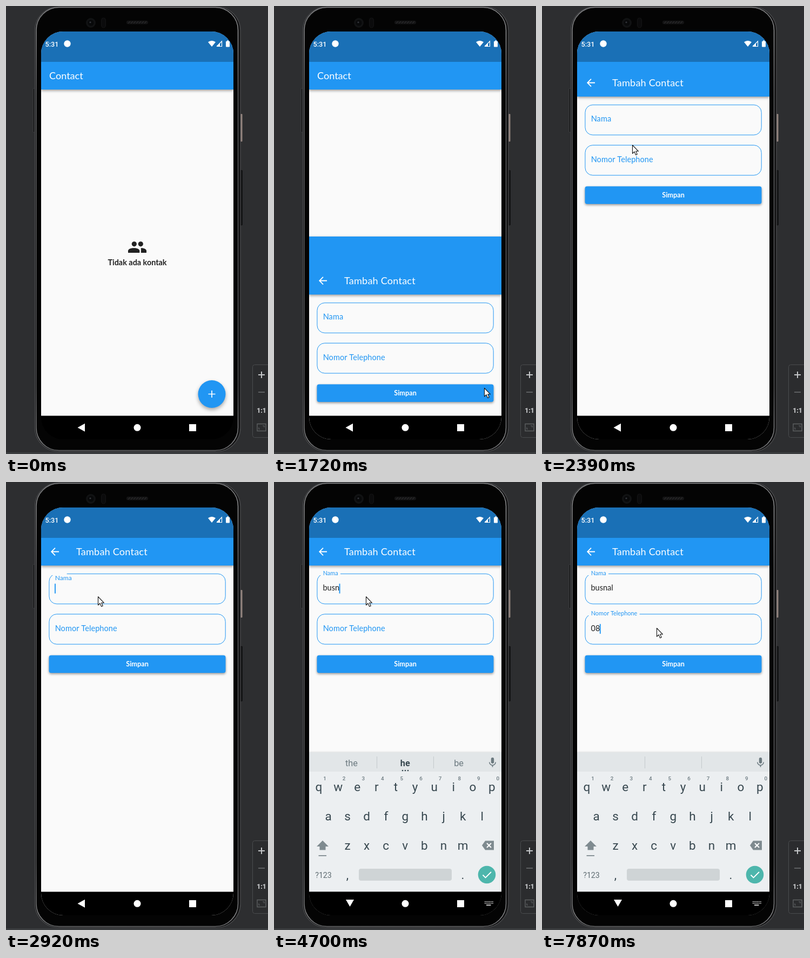
An HTML page with a canvas that plays this animation: 485 by 826 pixels, repeating every 8000 ms.

```html
<!DOCTYPE html>
<html lang="id">
<head>
<meta charset="utf-8">
<title>Contact</title>
<style>
html, body { margin: 0; width: 100%; height: 100%; overflow: hidden; background: #2d2e30; }
canvas { display: block; width: 485px; height: 826px; }
</style>
</head>
<body>
<canvas id="stage"></canvas>
<script>
const W = 485, H = 826, LOOP = 8000, STEP = 70;
const BLUE = '#2196f3', PAPER = '#fafafa', KEY = '#37474f', KEY_DIM = '#6c7a80';
const APP = 'Lato, sans-serif', SYS = 'Roboto, sans-serif';
const canvas = document.getElementById('stage');
const c = canvas.getContext('2d');
const dpr = window.devicePixelRatio || 1;
canvas.width = W * dpr;
canvas.height = H * dpr;

const NAME = 'busnal', PHONE = '08';
const NAME_AT = [4290, 4490, 4560, 4700, 4970, 5040];
const PHONE_AT = [7470, 7870];
const SLIDE = [[1270, 0], [1690, .337], [1900, .497], [2390, .826], [2740, 1]];
const MOUSE = [
  [220, 428, 826], [520, 362, 640], [620, 327, 603], [800, 360, 680], [990, 389, 704],
  [1690, 389, 704], [1900, 377, 656], [2390, 167, 256], [2670, 170, 211],
  [5610, 170, 211], [5960, 198, 293], [6380, 212, 269]
];
const HINTS = [
  [4630, 'the', 'he', 'be'], [4770, 'us', 'busy', 'bus'],
  [5170, 'bushel', NAME, 'casual'], [6600]
];

const clamp = v => Math.max(0, Math.min(1, v));
const mix = (a, b, p) => a + (b - a) * p;
const ramp = (t, a, b) => clamp((t - a) / (b - a));
const within = (t, a, b) => t >= a && t < b;
const typed = (text, times, t) => text.slice(0, times.filter(x => t >= x).length);

// Motion advances in held steps, as in a screen recording.
const held = t => Math.floor((t - 10) / STEP) * STEP + 10;

function track(keys, t) {
  let i = 0;
  while (i < keys.length - 2 && t >= keys[i + 1][0]) i++;
  const a = keys[i], b = keys[i + 1], p = ramp(t, a[0], b[0]);
  return a.slice(1).map((v, j) => mix(v, b[j + 1], p));
}

// cubic-bezier(.4, 0, .2, 1)
function standardEase(x) {
  let lo = 0, hi = 1;
  for (let i = 0; i < 24; i++) {
    const s = (lo + hi) / 2, r = 1 - s;
    if (1.2 * r * r * s + .6 * r * s * s + s * s * s < x) lo = s; else hi = s;
  }
  return lo * lo * (3 - 2 * lo);
}

function rect(x, y, w, h, fill) {
  c.fillStyle = fill;
  c.fillRect(x, y, w, h);
}

function round(x, y, w, h, r, fill, stroke, lw = 1) {
  c.beginPath();
  c.roundRect(x, y, w, h, r);
  if (fill) { c.fillStyle = fill; c.fill(); }
  if (stroke) { c.strokeStyle = stroke; c.lineWidth = lw; c.stroke(); }
}

function dot(x, y, r, fill) {
  c.beginPath();
  c.arc(x, y, r, 0, 7);
  c.fillStyle = fill;
  c.fill();
}

function path(pts, fill, stroke, lw = 1) {
  c.beginPath();
  for (let i = 0; i < pts.length; i += 2) c.lineTo(pts[i], pts[i + 1]);
  if (fill) { c.closePath(); c.fillStyle = fill; c.fill(); }
  if (stroke) { c.strokeStyle = stroke; c.lineWidth = lw; c.stroke(); }
}

function text(s, x, y, size, color, o = {}) {
  c.font = `${o.weight || 400} ${size}px ${o.font || APP}`;
  c.letterSpacing = (o.space || 0) + 'px';
  c.textAlign = o.align || 'left';
  c.fillStyle = color;
  c.fillText(s, x, y);
  return c.measureText(s).width;
}

function shaded(alpha, blur, dy, draw) {
  c.save();
  c.shadowColor = `rgba(0,0,0,${alpha})`;
  c.shadowBlur = blur * dpr;
  c.shadowOffsetY = dy * dpr;
  draw();
  c.restore();
}

function drawBody() {
  rect(0, 0, W, H, '#2d2e30');
  rect(0, 823, W, 3, '#3b3d3f');
  round(50, 152, 3, 81, 1, '#191a1b', '#48494b', .7);
  round(434, 199, 3.5, 51, 1, '#94857f');
  round(434, 303, 3.5, 101, 1, '#151617', '#090909', .7);

  const rim = c.createLinearGradient(0, 0, 0, H);
  rim.addColorStop(0, '#7c7d7f');
  rim.addColorStop(.06, '#a0a1a3');
  rim.addColorStop(.2, '#6c6d6f');
  rim.addColorStop(.85, '#5c5d5f');
  rim.addColorStop(.97, '#929395');
  rim.addColorStop(1, '#5c5d5f');
  round(53.5, 1.5, 380.5, 820, 44, '#131314', '#4c4d4f', 1.2);
  round(56, 2.5, 373.5, 817, 42, '#040404', rim, 1.3);

  dot(157, 31, 9, '#111213');
  dot(157, 31, 5.5, '#08090a');
  dot(156, 30, 1.6, '#34363b');
  round(176.5, 22, 8, 18, 4, '#0b0b0c', '#141415');
  round(223, 27, 40, 6.5, 3, '#141415');
  for (let x = 226; x < 261; x += 5) path([x, 32, x + 4, 28.5], null, '#2c2c2d', 1.2);
}

function drawTools() {
  round(456.5, 661.5, 40, 134, 4, '#2b2c2e', '#4a4c4e');
  path([467, 680, 479, 680], null, '#c4c6c8', 2);
  path([473, 674, 473, 686], null, '#c4c6c8', 2);
  path([467, 712, 479, 712], null, '#5d5f61', 2);
  text('1:1', 473, 749.5, 12, '#c4c6c8', { font: SYS, weight: 900, align: 'center' });
  round(465, 770.5, 16, 13, 0, null, '#5d5f61', 1.4);
  path([470, 780, 468, 780, 468, 777], null, '#5d5f61', 1.2);
  path([475, 774, 478, 774, 478, 777], null, '#5d5f61', 1.2);
}

function drawStatus() {
  rect(65, 47, 356, 56, '#1a70b6');
  text('5:31', 72.5, 74.5, 12.7, '#fff', { font: SYS, weight: 500 });
  dot(113.5, 69.5, 6.2, '#fff');
  c.beginPath();
  c.moveTo(381, 75);
  c.arc(381, 75, 11, -Math.PI * .72, -Math.PI * .28);
  c.fillStyle = '#fff';
  c.fill();
  path([390, 74.5, 399.5, 74.5, 399.5, 65, 390, 74.5], null, '#fff', 1.2);
  path([390, 74.5, 396, 74.5, 396, 68.5], '#fff');
  round(407, 65, 7, 10.5, 1.3, '#fff');
  rect(409, 63.5, 3, 2, '#fff');
}

function bar(y, h, title, x) {
  shaded(.4, 5, 2, () => rect(65, y, 356, h, BLUE));
  text(title, x, y + h - 19, 18.1, '#fff', { space: x > 100 ? .2 : 0 });
}

function drawHome() {
  rect(65, 47, 356, 709, PAPER);
  bar(47, 107, 'Contact', 80);
  const ink = '#212121';
  for (const x of [237.3, 249.3]) dot(x, 438.8, 4.6, ink);
  const bust = (x, w) => {
    c.beginPath();
    c.moveTo(x, 455);
    c.lineTo(x, 451.3);
    c.bezierCurveTo(x, 444.4, x + w, 444.4, x + w, 451.3);
    c.lineTo(x + w, 455);
    c.fillStyle = ink;
    c.fill();
  };
  c.save();
  c.beginPath();
  c.rect(249.9, 440, 12, 16);
  c.clip();
  bust(239, 21);
  c.restore();
  bust(226, 21.3);
  text('Tidak ada kontak', 243, 477.5, 14.4, ink, { weight: 700, align: 'center' });
  shaded(.34, 7, 3.5, () => dot(381, 715.5, 25.5, BLUE));
  path([374.5, 715.5, 387.5, 715.5], null, '#fff', 1.7);
  path([381, 709, 381, 722], null, '#fff', 1.7);
}

function field(y, label, float, value, caret) {
  round(79.9, y + .3, 326.3, 55.5, 14, null, BLUE, 1);
  const size = mix(14.5, 10.9, float);
  if (float > 0) {
    c.font = `400 ${size}px ${APP}`;
    c.letterSpacing = '0px';
    rect(86, y - 2, (c.measureText(label).width + 9) * float, 5, PAPER);
  }
  text(label, 90.7, mix(y + 31.3, y + 3, float), size, BLUE, { space: .07 * (1 - float) });
  const w = value ? text(value, 90.5, y + 31.3, 14.5, '#212121') : 0;
  if (caret) rect(90 + w, y + 18.5, 1.9, 18, BLUE);
}

function drawForm(t, off) {
  c.save();
  c.translate(0, off);
  rect(65, 47, 356, 752, PAPER);
  bar(47, 107, 'Tambah Contact', 130);
  path([98, 128.5, 84.5, 128.5], null, '#fff', 1.8);
  path([91, 121.7, 84.2, 128.5, 91, 135.3], null, '#fff', 1.8);
  const nameCaret = within(t, 2800, 6530) && !within(t, 4160, 4290) && !within(t, 5670, 6170);
  const phoneCaret = t >= 6530 && !within(t, 7010, 7470);
  field(169, 'Nama', ramp(held(t), 2740, 2950), typed(NAME, NAME_AT, t), nameCaret);
  field(243.3, 'Nomor Telephone', ramp(held(t), 6450, 6660), typed(PHONE, PHONE_AT, t), phoneCaret);
  shaded(.4, 4, 2, () => round(79.5, 319.5, 327, 32.5, 4, BLUE));
  text('Simpan', 243, 340, 12.7, '#fff', { weight: 700, align: 'center' });
  c.restore();
}

function keyRow(keys, x, y) {
  [...keys].forEach((k, i) => text(k, x + 35.6 * i, y, 22.5, KEY, { font: SYS, align: 'center' }));
}

function drawMic(x, y) {
  round(x - 2.7, y - 9, 5.4, 11, 2.7, KEY_DIM);
  c.beginPath();
  c.arc(x, y - .5, 5.7, 0, Math.PI);
  c.strokeStyle = KEY_DIM;
  c.lineWidth = 1.6;
  c.stroke();
  path([x, y + 5, x, y + 8.5], null, KEY_DIM, 1.8);
}

function drawKeyboard(t, off) {
  c.save();
  c.translate(0, off);
  shaded(.22, 3, -1, () => rect(65, 498.5, 356, 257, '#eceff1'));
  rect(65, 498.5, 356, 35.5, '#e2e6e8');
  for (const x of [190, 295]) rect(x, 506, 1, 22, '#c3c9cc');
  drawMic(404.5, 517);

  const hint = HINTS.filter(h => t >= h[0]).pop();
  if (hint && hint.length > 1) {
    hint.slice(1).forEach((s, i) => text(s, 143.5 + 99.3 * i, 523.5, 16.3, i === 1 ? KEY : KEY_DIM,
      { font: SYS, weight: i === 1 ? 700 : 400, align: 'center' }));
    for (const x of [238, 243, 248]) dot(x, 532, 1.3, KEY);
  }

  keyRow('qwertyuiop', 83, 569.5);
  keyRow('asdfghjkl', 100.5, 624);
  keyRow('zxcvbnm', 136, 678);
  [...'1234567890'].forEach((n, i) =>
    text(n, 94 + 35.6 * i, 550, 9.8, KEY_DIM, { font: SYS, weight: 500, align: 'center' }));

  const mod = '#7f8b90';
  path([90, 661, 101, 672, 95.5, 672, 95.5, 678.5, 84.5, 678.5, 84.5, 672, 79, 672], mod);
  rect(82.5, 688, 14.5, 1.8, mod);
  path([385, 670, 391, 661.5, 407, 661.5, 407, 678.5, 391, 678.5], mod);
  path([394, 666, 402, 674], null, '#fff', 1.9);
  path([402, 666, 394, 674], null, '#fff', 1.9);

  text('?123', 91.5, 729.5, 14.2, '#5f6c72', { font: SYS, align: 'center' });
  text(',', 136, 732, 22, KEY, { font: SYS, align: 'center' });
  round(157, 713, 172, 22, 4, '#cfd4d6');
  text('.', 349.5, 732, 22, KEY, { font: SYS, align: 'center' });
  dot(394, 724, 16.3, '#4db6ac');
  path([386.5, 724.5, 391.5, 729.5, 402, 719], null, '#fff', 1.8);
  rect(65, 755.5, 356, 44, '#000');
  c.restore();
}

function drawNav(open) {
  path(open ? [133, 770, 148, 770, 140.5, 783] : [132.5, 777.3, 146, 769.8, 146, 784.8], '#fff');
  dot(243, 777.3, 6.5, '#fff');
  rect(339, 771, 13, 13, '#fff');
  if (!open) return;
  for (let x = 390; x < 405; x += 2.8) {
    rect(x, 773, 1.6, 1.6, '#ddd');
    rect(x, 776, 1.6, 1.6, '#ddd');
  }
  rect(393, 779.3, 8.5, 1.7, '#ddd');
}

function drawMouse(x, y) {
  c.save();
  c.translate(x, y);
  c.lineJoin = 'round';
  path([.5, .5, .5, 16, 4, 12.7, 6.6, 18.6, 9.2, 17.4, 6.7, 11.8, 11.5, 11.8, .5, .5], '#fff', '#111', 1.1);
  c.restore();
}

function draw(t) {
  const m = held(t);
  c.setTransform(dpr, 0, 0, dpr, 0, 0);
  drawBody();
  drawTools();

  c.save();
  c.beginPath();
  c.roundRect(65, 47, 356, 752, 41);
  c.clip();
  const off = Math.round(709 * (1 - standardEase(track(SLIDE, m)[0])));
  if (off > 0) drawHome();
  if (off < 709) drawForm(t, off);
  drawStatus();
  rect(65, 755.5, 356, 44, '#000');
  const open = m > 3050;
  if (open) drawKeyboard(t, Math.round(301 * Math.pow(1 - ramp(m, 3050, 3650), 3)));
  drawNav(open);
  c.restore();

  if (t >= 260) drawMouse(...track(MOUSE, m).map(Math.round));
}

const start = performance.now();
function tick() {
  draw((performance.now() - start) % LOOP);
  requestAnimationFrame(tick);
}
tick();
</script>
</body>
</html>
```
